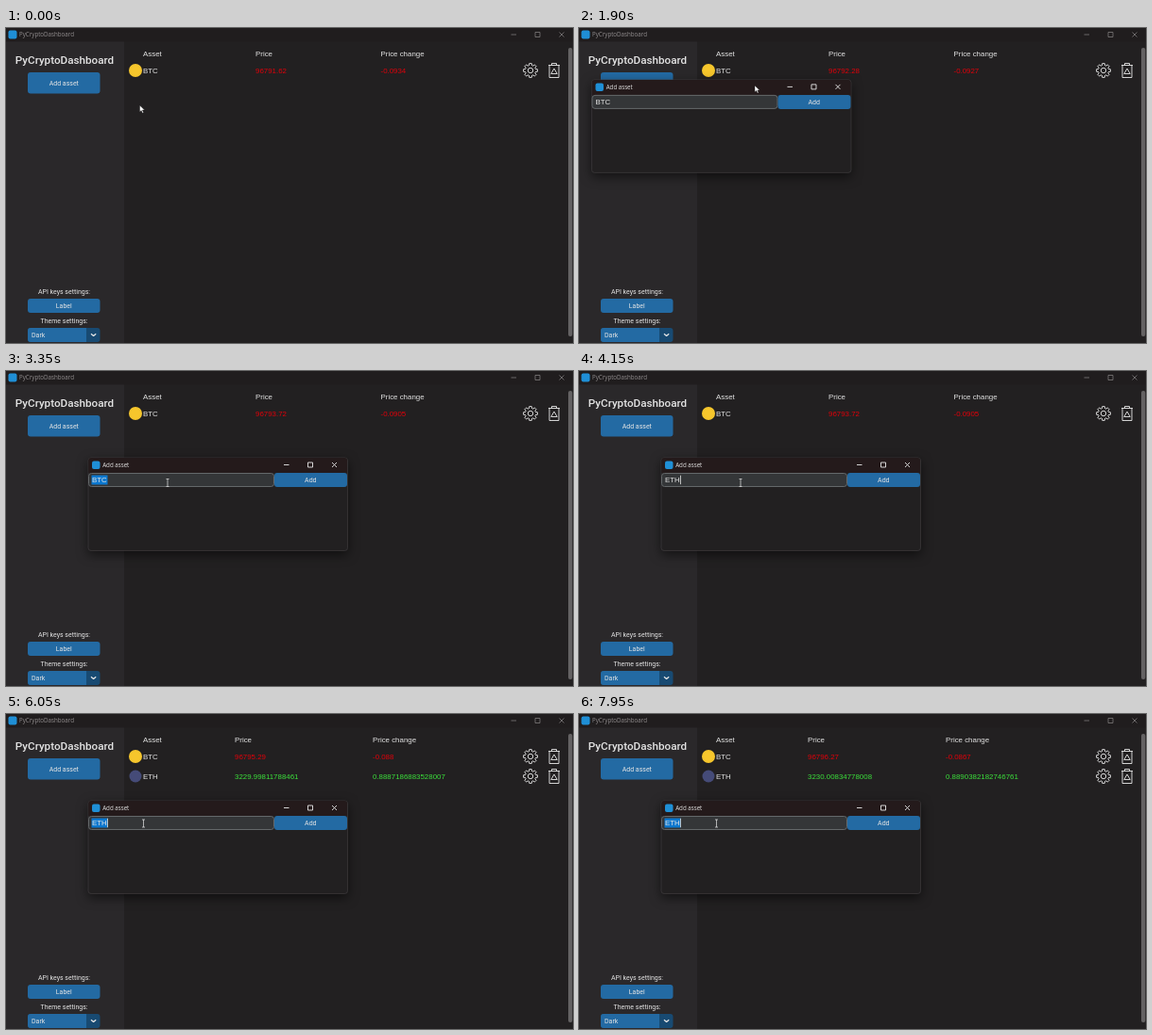
Animation of 600x334 px, one loop 8 s. Source, as an HTML page:

```html
<!DOCTYPE html>
<html lang="en">
<head>
<meta charset="utf-8">
<title>PyCryptoDashboard</title>
<style>
  html, body { margin: 0; width: 100%; height: 100%; overflow: hidden; background: #222021; }
  svg { display: block; width: 100vw; height: 100vh; }
  text { fill: #e4e4e4; font: 7px Roboto, sans-serif; }
  .mid { text-anchor: middle; }
  .caption { font: 6.2px "Open Sans", sans-serif; }
  .cell { font: 7.9px "Liberation Sans", Arial, sans-serif; }
  .heading { font: 500 11.7px Roboto, sans-serif; }
  .down { fill: #e0000a; }
  .up { fill: #3be03b; }
  .button { fill: #236aa3; }
  .line { fill: none; stroke: #e8e8e8; stroke-width: .9; stroke-linejoin: round; }
  .dim { stroke: #8c8889; stroke-width: .7; }
  #dialog { filter: drop-shadow(0 4px 6px rgba(0, 0, 0, .55)); }
</style>
</head>
<body>
<svg viewBox="0 0 600 334">
  <defs>
    <path id="controls" d="M0 0h5.5M25.5-2.5h5v5h-5zM51-2.5l5 5m0-5l-5 5"/>
    <g id="tools" class="line">
      <path id="gear"/>
      <circle cx="555" r="2.7"/>
      <path d="M574-5.5h12M577.5-5.5v-2h5v2M575-5.5v13h10v-13M580-2l3.2 5.5h-6.4z"/>
    </g>
  </defs>

  <rect width="600" height="334" fill="#222021"/>
  <rect y="14" width="125" height="320" fill="#2a282a"/>
  <rect width="600" height="14.5" fill="#201d1e"/>
  <rect x="2.5" y="2.5" width="9" height="9" rx="2" fill="#1f8fd6"/>
  <text class="caption" x="14" y="9.4" style="fill:#928e8f">PyCryptoDashboard</text>
  <use href="#controls" class="line dim" x="534.5" y="7"/>

  <text class="heading mid" x="62" y="37.8">PyCryptoDashboard</text>
  <rect id="open" class="button" x="23" y="47" width="76.5" height="22.5" rx="3"/>
  <text class="mid" x="61.3" y="60.6">Add asset</text>
  <text class="mid" x="61.5" y="281.8">API keys settings:</text>
  <rect class="button" x="23" y="287" width="76.5" height="15" rx="3"/>
  <text class="mid" x="61.3" y="297">Label</text>
  <text class="mid" x="61.5" y="312.6">Theme settings:</text>
  <rect x="23" y="318" width="76.5" height="15" rx="3" fill="#184a72"/>
  <path class="button" d="M26 318H85v15H26a3 3 0 0 1-3-3v-9a3 3 0 0 1 3-3z"/>
  <text x="27" y="328">Dark</text>
  <path class="line" d="M90 324.3l2.6 2.2 2.6-2.2" style="stroke-width:1.2"/>
  <rect x="595" y="21" width="4.3" height="306" rx="2" fill="#646263"/>

  <text class="cell" x="145" y="29.8">Asset</text>
  <text class="cell price" y="29.8">Price</text>
  <text class="cell change" y="29.8">Price change</text>
  <circle cx="137" cy="45" r="7" fill="#f6c62c"/>
  <text class="cell" x="145" y="47.6">BTC</text>
  <text class="cell price down" id="btcPrice" y="47.6"></text>
  <text class="cell change down" id="btcChange" y="47.6"></text>
  <use href="#tools" y="45"/>
  <g id="ethRow">
    <circle cx="137" cy="66" r="6.5" fill="#454b78"/>
    <text class="cell" x="145" y="68.6">ETH</text>
    <text class="cell price up" id="ethPrice" y="68.6"></text>
    <text class="cell change up" id="ethChange" y="68.6"></text>
    <use href="#tools" y="66"/>
  </g>

  <g id="dialog">
    <rect width="274.5" height="98.5" rx="3" fill="#222021" stroke="#454243" stroke-width=".6"/>
    <path d="M.3 16V3a3 3 0 0 1 3-3H271a3 3 0 0 1 3 3V16z" fill="#241a1b"/>
    <rect x="4" y="3.5" width="8.5" height="8.5" rx="2" fill="#1f8fd6"/>
    <text class="caption" x="15.2" y="10">Add asset</text>
    <use href="#controls" class="line" x="207" y="7.5"/>
    <rect x=".5" y="16.5" width="196" height="14" rx="3" fill="#343638" stroke="#64686a"/>
    <rect id="selection" x="3.5" y="18.5" width="17" height="10" fill="#0b78d0"/>
    <text id="entry" class="cell" x="4" y="26.3"></text>
    <rect id="caret" y="18.7" width=".8" height="9.5" fill="#e4e4e4"/>
    <rect id="add" class="button" x="197" y="16" width="77" height="15" rx="3"/>
    <text class="mid" x="235.3" y="25.8">Add</text>
  </g>

  <g id="pointer">
    <path id="arrow" d="M0 0v7l1.7-1.5 1.2 2.7 1.2-.5-1.2-2.7h2.3z" fill="#fff" stroke="#111" stroke-width=".4"/>
    <path id="beam" class="line" d="M-1.5-4h3M0-4v8M-1.5 4h3" style="stroke-width:.7"/>
    <path id="hand" d="M-.8.5q.8-1 1.6 0v3l3 .8q.7.3.6 1.2L3.8 9.5h-4L-2.5 6q-.2-1 .7-.8l1 .8z" fill="#fff" stroke="#111" stroke-width=".4"/>
  </g>
</svg>
<script>
const LOOP = 8000, OPENED = 950, DRAG = [1450, 2200], ADDED = 5500;
const el = id => document.getElementById(id);
const show = (id, visible) => el(id).style.display = visible ? '' : 'none';
const within = (t, from, to) => t >= from && t < to;

// Each step is [start time, ...values]; the last one started is current.
const current = (steps, t) => steps.findLast(step => t >= step[0]).slice(1);

const btc = [
  [0, '96791.62', '-0.0934'], [950, '96792.28', '-0.0927'],
  [2600, '96793.72', '-0.0905'], [4200, '96794.48', '-0.0894'],
  [ADDED, '96795.29', '-0.088'], [7100, '96796.27', '-0.0867']
];
const eth = [
  [0, '3229.99811788461', '0.8887186883528007'],
  [7750, '3230.00834778008', '0.8890382182746761']
];
const typed = [[0, 'BTC'], [3650, 'E'], [3900, 'ET'], [4100, 'ETH']];
const shapes = [
  [0, 'arrow'], [480, 'hand'], [OPENED, 'arrow'], [2600, 'beam'],
  [4820, 'hand'], [5680, 'beam']
];
const path = [
  [0, 141.5, 82], [150, 141.5, 82], [700, 72, 59], [950, 72, 59], [1050, 85, 62],
  [1400, 50, -8], [DRAG[0], 49.5, -8], [DRAG[1], 259.5, 98], [2350, 259.5, 98],
  [2850, 171, 118.5], [4350, 171, 118.5], [4850, 287, 114], [5050, 303, 114],
  [5500, 303, 114], [5950, 145.5, 116]
];

function pointerAt(t) {
  const next = path.findIndex(point => point[0] > t);
  if (next < 0) return path.at(-1).slice(1);
  const [t0, x0, y0] = path[next - 1], [t1, x1, y1] = path[next];
  const u = (t - t0) / (t1 - t0), k = u * u * (3 - 2 * u);
  return [x0 + (x1 - x0) * k, y0 + (y1 - y0) * k];
}

function setColumn(name, x) {
  document.querySelectorAll('.' + name).forEach(cell => cell.setAttribute('x', x));
}

function fillRow(name, [price, change]) {
  el(name + 'Price').textContent = price;
  el(name + 'Change').textContent = change;
}

function gearPath() {
  const points = [];
  for (let tooth = 0; tooth < 8; tooth++) {
    for (const [offset, r] of [[-.27, 5.6], [-.17, 7.5], [.17, 7.5], [.27, 5.6]]) {
      const a = tooth * Math.PI / 4 + offset;
      points.push(`${555 + r * Math.cos(a)} ${r * Math.sin(a)}`);
    }
  }
  return `M${points.join('L')}z`;
}

function render(t) {
  const [x, y] = pointerAt(t);
  const [shape] = current(shapes, t);
  el('pointer').setAttribute('transform', `translate(${x} ${y})`);
  for (const id of ['arrow', 'beam', 'hand']) show(id, id === shape);

  const added = t >= ADDED;
  setColumn('price', added ? 242 : 264);
  setColumn('change', added ? 388 : 396.5);
  fillRow('btc', current(btc, t));
  fillRow('eth', current(eth, t));
  show('ethRow', added);

  // The dialog is held by its title bar while it is dragged.
  const [grabX, grabY] = pointerAt(Math.min(Math.max(t, DRAG[0]), DRAG[1]));
  el('dialog').setAttribute('transform', `translate(${grabX - 172.5} ${grabY - 6})`);
  show('dialog', t >= OPENED);

  const [word] = current(typed, t);
  el('entry').textContent = word;
  show('selection', within(t, 3100, 3650) || t >= 6000);
  show('caret', within(t, 3650, 5200) || t >= 6000);
  el('caret').setAttribute('x', 4.3 + [0, 5.3, 10.1, 15.8][word.length]);

  el('open').style.fill = within(t, 480, OPENED) ? '#184a72' : '';
  el('add').style.fill = within(t, 4820, 5680) ? '#184a72' : '';
}

el('gear').setAttribute('d', gearPath());
const start = performance.now();
function tick() {
  render((performance.now() - start) % LOOP);
  requestAnimationFrame(tick);
}
tick();
</script>
</body>
</html>
```
